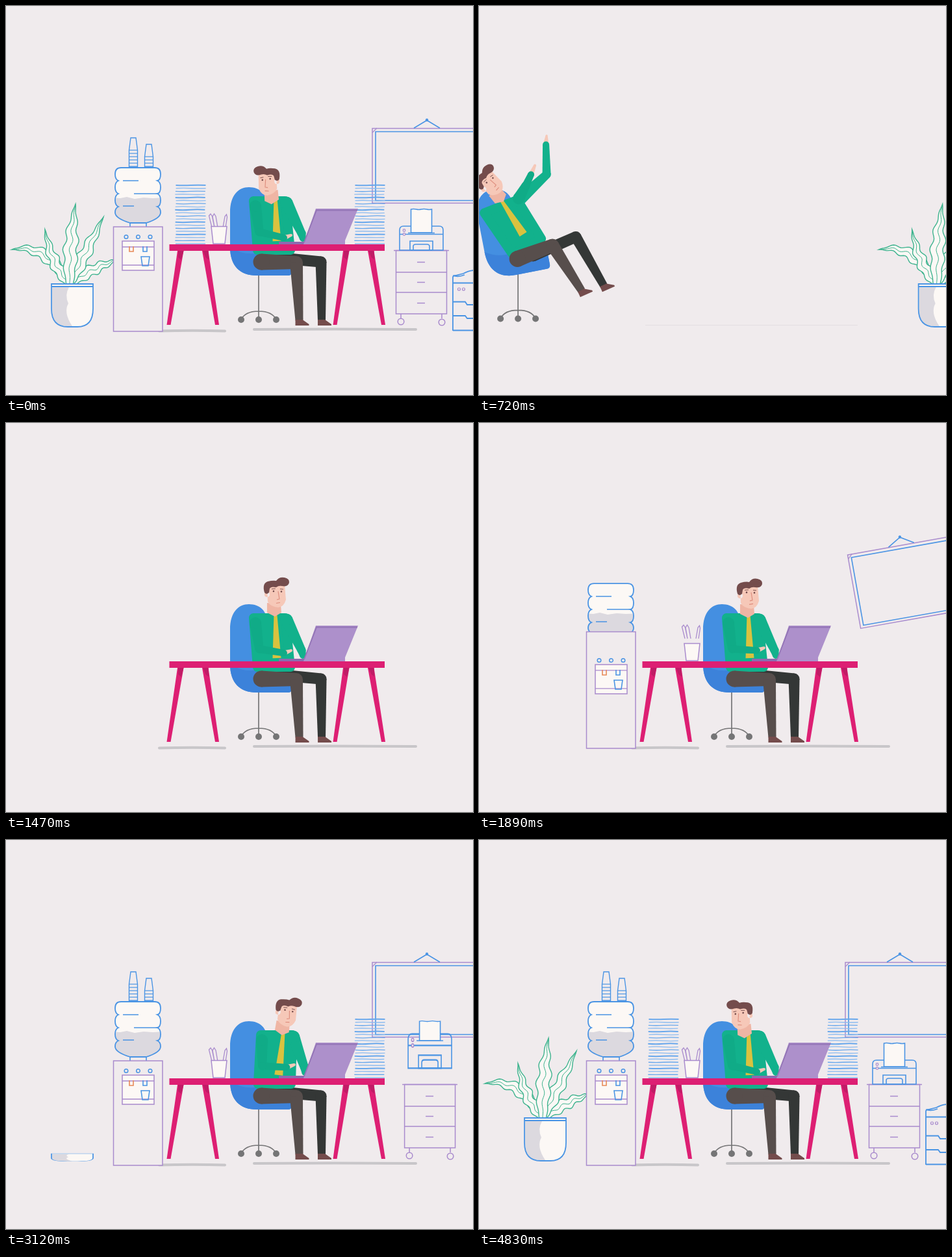
Write an HTML page with a canvas that moves like this. It is 719 px wide and 599 px high and loops after 4860 ms.

```html
<!DOCTYPE html>
<html>
<head>
<meta charset="utf-8">
<style>
html, body { margin: 0; width: 100%; height: 100%; overflow: hidden; background: #f0ebed; }
canvas { display: block; }
</style>
</head>
<body>
<canvas id="stage" width="719" height="599"></canvas>
<script>
const c = document.getElementById('stage').getContext('2d');
const LOOP = 4860;
const BG = '#f0ebed', CREAM = '#fcf8f5', BLUE = '#4a94e4', PURPLE = '#a98bcd', PINK = '#dd1f73',
  GREEN = '#12b18c', SLEEVE = '#10ab87', SKIN = '#f6c8b8', BROWN = '#574e4c', DARK = '#343736',
  HAIR = '#744c4c', GREY = '#757576', MIST = '#dcd9df', TIE = '#d9c23f';

// Timing
const span = (t, a, b) => Math.min(1, Math.max(0, (t - a) / (b - a)));
const mix = (a, b, k) => a + (b - a) * k;
const smooth = k => k * k * (3 - 2 * k);
const back = k => 1 - 2.85 * (1 - k) ** 3 + 1.85 * (1 - k) ** 2;

// Drawing
function draw(d, fill, stroke, width = 1.6) {
  const path = new Path2D(d);
  if (fill) { c.fillStyle = fill; c.fill(path); }
  if (stroke) { c.strokeStyle = stroke; c.lineWidth = width; c.stroke(path); }
}
const box = (x, y, w, h) => `M${x} ${y}h${w}v${h}h${-w}Z`;
const poly = pts => 'M' + pts.map(p => p.join(' ')).join('L') + 'Z';
const dot = (x, y, r) => `M${x - r} ${y}a${r} ${r} 0 1 0 ${2 * r} 0a${r} ${r} 0 1 0 ${-2 * r} 0Z`;
function around(x, y, { dx = 0, dy = 0, turn = 0, sx = 1, sy = 1 }, paint) {
  c.save();
  c.translate(x + dx, y + dy);
  c.rotate(turn * Math.PI / 180);
  c.scale(sx, sy);
  c.translate(-x, -y);
  paint();
  c.restore();
}
function clipped(d, paint) {
  c.save();
  c.clip(new Path2D(d));
  paint();
  c.restore();
}
function limb([x1, y1], [x2, y2], w1, w2, fill, round = true) {
  const a = Math.atan2(y2 - y1, x2 - x1), s = Math.sin(a) / 2, k = Math.cos(a) / 2;
  draw(poly([[x1 + s * w1, y1 - k * w1], [x2 + s * w2, y2 - k * w2],
    [x2 - s * w2, y2 + k * w2], [x1 - s * w1, y1 + k * w1]]), fill);
  if (round) draw(dot(x1, y1, w1 / 2) + dot(x2, y2, w2 / 2), fill);
}

function board(t) {
  if (t < 1500) return;
  const k = t - 1500;
  const turn = -75 * Math.exp(-k / 195) * Math.cos(k / 62);
  around(648, 176, { dx: 170 * (1 - span(t, 1500, 1620)) ** 2, turn }, () => {
    draw(box(564, 188.5, 168, 115), null, PURPLE, 1.5);
    draw('M564 195L571 188', null, PURPLE, 1.2);
    draw(box(569, 193.5, 158, 106), null, BLUE);
    draw('M628 188L648 176L668 188', null, BLUE);
    draw(dot(648, 175.5, 2.2), BLUE);
  });
}

function leaf(cx, cy, tipX, tipY, w, g) {
  if (g <= 0) return;
  const left = [], right = [], rib = [];
  for (let i = 0; i <= 36; i++) {
    const u = i / 36, v = 1 - u, bx = 98, by = 428;
    const x = mix(bx, 2 * u * v * cx + v * v * bx + u * u * tipX, g);
    const y = mix(by, 2 * u * v * cy + v * v * by + u * u * tipY, g);
    const a = Math.atan2(v * (cy - by) + u * (tipY - cy), v * (cx - bx) + u * (tipX - cx));
    const wave = 2.4 * Math.sin(u * 26) * Math.sin(Math.PI * u), half = w * Math.sin(Math.PI * (.18 + .82 * u));
    const at = o => [x - Math.sin(a) * o, y + Math.cos(a) * o];
    left.push(at(wave - half));
    right.unshift(at(wave + half));
    rib.push(at(wave));
  }
  draw(poly([...left, ...right]), CREAM, '#3db38e', 1.4);
  draw('M' + rib.map(p => p.join(' ')).join('L'), null, '#3db38e', 1);
}

function plant(t) {
  if (t < 3060) return;
  const mid = .9 * smooth(span(t, 3540, 4040)) + .1 * span(t, 3900, 4300), side = back(span(t, 3930, 4300));
  leaf(60, 364, 9, 375, 8, side);
  leaf(135, 402, 172, 391, 8, side);
  leaf(70, 400, 60, 344, 8, mid);
  leaf(120, 385, 150, 325, 9, mid);
  leaf(98, 365, 107, 305, 10, mid);
  around(102, 495, { sy: mix(.05, 1, back(span(t, 3110, 3480))) }, () => {
    draw('M70 428H134V466Q134 494 110 494H95Q70 494 70 466Z', CREAM);
    draw('M71 433H97Q90 445 96 458Q88 472 102 493H95Q71 494 71 466Z', MIST);
    draw('M70 428H134V466Q134 494 110 494H95Q70 494 70 466ZM70 432H134', null, BLUE, 1.8);
  });
}

const BOTTLE = 'M177 249H229Q238 249 238 259Q238 268 233 269Q238 271 238 279Q238 288 233 289Q238 291 238 299' +
  'Q238 308 233 309Q238 311 238 318Q238 327 216 334H191Q168 327 168 318Q168 311 173 309Q168 307 168 299' +
  'Q168 291 173 289Q168 287 168 279Q168 271 173 269Q168 267 168 259Q168 249 177 249Z';

function cooler(t) {
  if (t < 1660) return;
  const top = 501 - 161 * back(span(t, 1660, 2060));
  const sink = 100 * (1 - span(t, 1660, 2050)) ** 2;
  clipped(box(150, 0, 110, top), () => around(203, 340, { dy: top - 340 + sink }, () => {
    draw(BOTTLE, CREAM);
    clipped(BOTTLE, () => draw('M160 295L176 296L186 294L198 297L212 295L226 296L245 295V340H160Z', MIST));
    draw(BOTTLE, null, BLUE, 1.8);
    draw('M180 269H204M197 289H235M180 308H197M191 334V341M216 334V341', null, BLUE);
  }));
  const body = box(165.5, top, 75.5, 501 - top);
  draw(body, BG);
  clipped(body, () => around(203, 340, { dy: sink * .6 }, () => {
    for (const x of [185, 203.5, 222]) draw(dot(x, 355.5, 2.8), null, BLUE, 1.5);
    draw(box(179, 362, 49, 45), CREAM, PURPLE, 1.5);
    draw('M179 371H228M179 399H228', null, PURPLE, 1.3);
    draw('M190 370V378H196V370', null, '#e88a58');
    draw('M211 370V378H217V370M208 386H221L219 400H210Z', null, BLUE);
  }));
  draw(body, null, PURPLE, 1.5);

  for (const [x, y, rim, start] of [[196, 203, 222, 2230], [220, 213, 232, 2330]]) {
    if (t < start) continue;
    around(x, 248, { dy: -98 * (1 - span(t, start, start + 240) ** 2) }, () => {
      draw(`M${x - 6.5} ${rim}L${x - 4} ${y}H${x + 4}L${x + 6.5} ${rim}V248H${x - 6.5}Z`, null, BLUE, 1.4);
      for (let r = rim; r < 248; r += 5) draw(`M${x - 6.5} ${r}h13`, null, BLUE, 1.2);
    });
  }
}

// Sheets are released one by one, the lowest first, and fall freely.
function stack(t, x, start) {
  for (let i = 0; i < 20; i++) {
    const age = t - start - i * 16.7;
    if (age < 0) continue;
    const y = Math.min(366 - i * 4.74, 98 + .000514 * age * age);
    const l = x + Math.sin(i * 5) * .7;
    draw(`M${l} ${y}q12 ${Math.sin(i * 3)} 23 0t23 0`, null, i % 2 ? '#69a8ec' : '#8fbdf0', i % 4 == 3 ? 2 : 1.4);
  }
}

function cabinet(t) {
  if (t < 2550) return;
  const dx = 230 * (1 - span(t, 2550, 3300)) ** 2;
  around(640, 376, { dx }, () => {
    draw(box(600.5, 376.5, 78, 97.5), null, PURPLE, 1.5);
    draw('M597 376.5H682M600 410H679M600 441H679M633 394.5h12M633 425.5h12M633 457.5h12M608 474v7M671 474v7', null, PURPLE, 1.5);
    draw(dot(608, 486, 4.8) + dot(671, 487, 4.8), null, PURPLE, 1.5);
  });
  if (t < 2950) return;
  const fall = 150 * (1 - span(t, 2950, 3137) ** 2), k = t - 3137;
  const sy = k < 0 ? 1.43 : 1 + .3 * Math.exp(-k / 110) * Math.cos(k / 45 + .6);
  around(640, 376, { dx, dy: -fall, sy }, () => {
    draw('M606 376V345Q606 339 612 339H667Q673 339 673 345V376ZM606 351.5H673', null, BLUE);
    draw(box(622, 362, 35, 14), null, BLUE);
    draw('M627 376V370Q627 367 631 367H648Q652 367 652 370V376', null, BLUE);
    draw(dot(613, 345.5, 1.8) + dot(613, 351.5, 1.8), BG, PURPLE, 1.2);
  });
  around(640, 350, { dx, dy: k < 0 ? -fall - 16 : (1 - sy) * 26, sy: k < 0 ? .82 : 1 }, () => {
    draw('M623.5 349V313q4 -1 8 0t8 0t8 0t8 0V349Z', CREAM, BLUE);
    draw('M619 349.5H660', null, BLUE);
  });
}

function copier(t) {
  if (t < 3860) return;
  around(700, 500, { sy: back(span(t, 3867, 4330)) }, () => {
    draw('M688 500V418Q688 415 692 415L704 412Q714 407 722 407M688 426.5H722M688 455.5H707L710 460H722' +
      'M688 477H707L710 481H722M688 499.5H722M688 415Q696 418 706 414', null, BLUE, 1.8);
    draw(dot(697.5, 436, 2) + dot(704.5, 436, 2), null, PURPLE, 1.2);
  });
}

function pencils(t) {
  if (t < 1560) return;
  around(328, 367, { sy: back(span(t, 1560, 1760)) }, () => {
    const dy = -9 * Math.sin(Math.PI * span(t, 1720, 2060));
    around(328, 340, { dy }, () => draw('M317 341L312.5 323L315 320L317.5 324L321 341M321 341L318 324L320.5 320L323 324' +
      'L326 341M334 341L337 324L339.5 321L340.5 325L338 341', null, PURPLE, 1.3));
    draw('M316 339.5H340L337 366H319Z', CREAM, PURPLE, 1.5);
  });
}

function chair(tilt) {
  draw('M389 412V483M362 483Q368 470 389 470Q410 470 416 483', null, GREY, 1.7);
  for (const x of [362, 389, 416]) draw(dot(x, 483, 5), GREY);
  around(389, 415, { turn: tilt }, () => {
    draw('M345 318C345 291 358 279 374 279C391 279 402 290 402 306V378H440V409Q440 415 434 415H386C360 415 345 400 345 372Z', '#448fe1');
    draw('M345 371Q365 385 390 380H440V409Q440 415 434 415H386C360 415 345 400 345 371Z', '#3c82da');
  });
}

function head([x, y], turn, flip) {
  around(0, 0, { dx: x, dy: y, turn, sx: flip }, () => {
    draw('M-9 -14L12 -12L13 1L3 7L-9 1Z', '#efb5a4');
    draw('M-9 -43L18 -43L20 -19Q17 -8 8 -7Q-4 -8 -8 -16Z' + dot(-9, -27, 4), SKIN);
    draw('M-13 -30Q-17 -44 -8 -47Q0 -49 5 -48Q10 -55 18 -53Q26 -51 25 -45Q23 -38 14 -40Q9 -41 5 -38Q-3 -40 -5 -36L-6 -30Q-10 -26 -13 -30Z', HAIR);
    draw(dot(1, -32, 1.3) + dot(13, -31.5, 1.3), HAIR);
    draw('M8 -32L10 -20L6 -19M5 -13.5L11 -14.5', null, '#dd8c7c', 1.1);
    draw('M-2 -35.5L4 -36M11 -35.5L16 -35', null, HAIR, .9);
  });
}

// x, y pairs: torso (4), neck, tie end, right arm (4), left arm (4), near leg (3), far leg (3); then head and foot angles.
const FLY = [337, 320, 388, 300, 425, 360, 380, 383, 360, 299, 397, 353, 390, 301, 433, 261, 432, 215, 433, 201,
  390, 298, 401, 278, 409, 261, 415, 247, 388, 391, 442, 370, 487, 440, 412, 386, 478, 357, 521, 432, -39, -24];
const LAND = [366, 302, 417, 300, 431, 375, 380, 375, 390, 293, 409, 348, 420, 302, 468, 324, 505, 301, 519, 292,
  372, 308, 383, 350, 418, 354, 441, 346, 395, 395, 450, 388, 473, 466, 420, 388, 492, 388, 523, 458, -12, -10];
const WORK = [381, 300, 430, 300, 438, 376, 387, 376, 411, 293, 417, 362, 432, 303, 455, 350, 457, 358, 458, 361,
  384, 308, 390, 348, 428, 350, 439, 346, 393, 394, 447, 395, 451.5, 484, 420, 388, 485, 394, 486, 484, 0, 0];

function man(t) {
  const land = smooth(span(t, 720, 1110)), work = smooth(span(t, 1110, 1480));
  const pose = WORK.map((v, i) => mix(mix(FLY[i], LAND[i], land), v, work));
  const lean = smooth(span(t, 2250, 2600)) - smooth(span(t, 3400, 3750));
  const typing = work * (3.5 - 3.5 * Math.cos((t - 3120) / 312 * 2 * Math.PI));
  const P = [];
  for (let i = 0; i < 20; i++) {
    let [x, y] = pose.slice(2 * i, 2 * i + 2);
    if (i < 14) x += lean * 12 * (383 - y) / 90;
    if (i == 12 || i == 13) y += typing;
    P.push([x, y]);
  }
  const [headTurn, footTurn] = pose.slice(40);
  const shoe = ([x, y]) => around(x, y, { turn: footTurn }, () =>
    draw(`M${x - 6} ${y - 1}H${x + 5}L${x + 15} ${y + 6}V${y + 8}H${x - 6}Z`, HAIR));

  chair(-11 * (1 - land) - 2 * land * (1 - work));
  limb(P[17], P[18], 18, 17, DARK);
  limb(P[18], P[19], 17, 12, DARK, false);
  shoe(P[19]);
  c.lineJoin = 'round';
  draw(poly(P.slice(0, 4)), GREEN, GREEN, 14);
  limb(P[14], P[15], 25, 20, BROWN);
  limb(P[15], P[16], 20, 12, BROWN, false);
  shoe(P[16]);

  limb(P[8], P[9], 9, 3, SKIN);
  limb(P[6], P[7], 19, 13, GREEN);
  limb(P[7], P[8], 13, 10, GREEN);
  const [nx, ny] = P[4];
  limb([nx + 4, ny + 3], P[5], 5, 13, TIE, false);
  limb(P[12], P[13], 8, 4, SKIN);
  limb(P[10], P[11], 18, 13, SLEEVE);
  limb(P[11], P[12], 12, 10, SLEEVE);
  const away = t > 4260;
  const bob = (away ? 8 : 0) - typing * .45;
  head([nx, ny + bob], away ? -6 : headTurn + lean * 10, away ? -1 : 1);
}

function desk(t) {
  if (t < 740) return draw('M256 491.5H583', null, '#e4dfe2', 1);
  const top = mix(491, 367, back(span(t, 720, 1040)));
  const thick = mix(50, 10, smooth(span(t, 1110, 1350))) * span(t, 720, 900);
  const splay = back(span(t, 1110, 1420));
  const under = top + thick, foot = mix(493, 491, splay);
  if (under < foot) [[264, -16.5], [302, 20], [519, -15.5], [557, 21]].forEach(([x, reach]) => {
    const b = x + mix(3, reach, splay), l = x + 1 - splay;
    draw(poly([[l, under], [l + 8.5 + splay, under], [b + 6, foot], [b, foot]]), PINK);
    const s = reach * splay * .12;
    draw(poly([[l + 1, under], [l + 8.5 + splay, under], [l + 8 + s, under + 14 * splay], [l + 3 + s, under + 10 * splay]]), '#c01c66');
  });
  draw(box(251.5, top, 331.5, thick), PINK);

  if (t < 1080) return;
  around(470, 367, { sy: mix(.03, 1, back(span(t, 1120, 1460))) }, () => {
    draw('M420 367V363H462V367Z', '#8c6bb0');
    draw('M477 312H542L522 361V367H458Z', '#ad90cb');
    draw('M459 364L478 314.5H541', null, '#9374b6', 1.8);
  });
}

function scene(t) {
  const k = smooth(span(t, 800, 1060));
  if (k > 0) {
    c.lineCap = 'round';
    draw(`M${mix(287, 236, k)} 500.5Q287 499 ${mix(287, 337, k)} 500.5M${mix(506, 382, k)} 498Q506 497 ${mix(506, 631, k)} 498`,
      null, '#c8c6c9', 4);
    c.lineCap = 'butt';
  }
  board(t);
  plant(t);
  cooler(t);
  stack(t, 261, 3250);
  stack(t, 537, 1900);
  cabinet(t);
  copier(t);
  pencils(t);
  roll(t);
  desk(t);
}

const roll = t => {
  const left = Math.max(0, 1338 - t);
  around(0, 0, { dx: -.000864 * left ** 2, dy: -.0025 * left }, () => man(t));
};

function frame(now) {
  const t = now % LOOP;
  c.fillStyle = BG;
  c.fillRect(0, 0, 719, 599);
  // The finished office slides away to the right while he rolls in from the left.
  if (t < 850) around(0, 0, { dx: .001167 * t * t }, () => scene(LOOP - 30));
  if (t > 700) scene(t);
  else if (t > 500) roll(t);
  requestAnimationFrame(frame);
}
requestAnimationFrame(frame);
</script>
</body>
</html>
```
